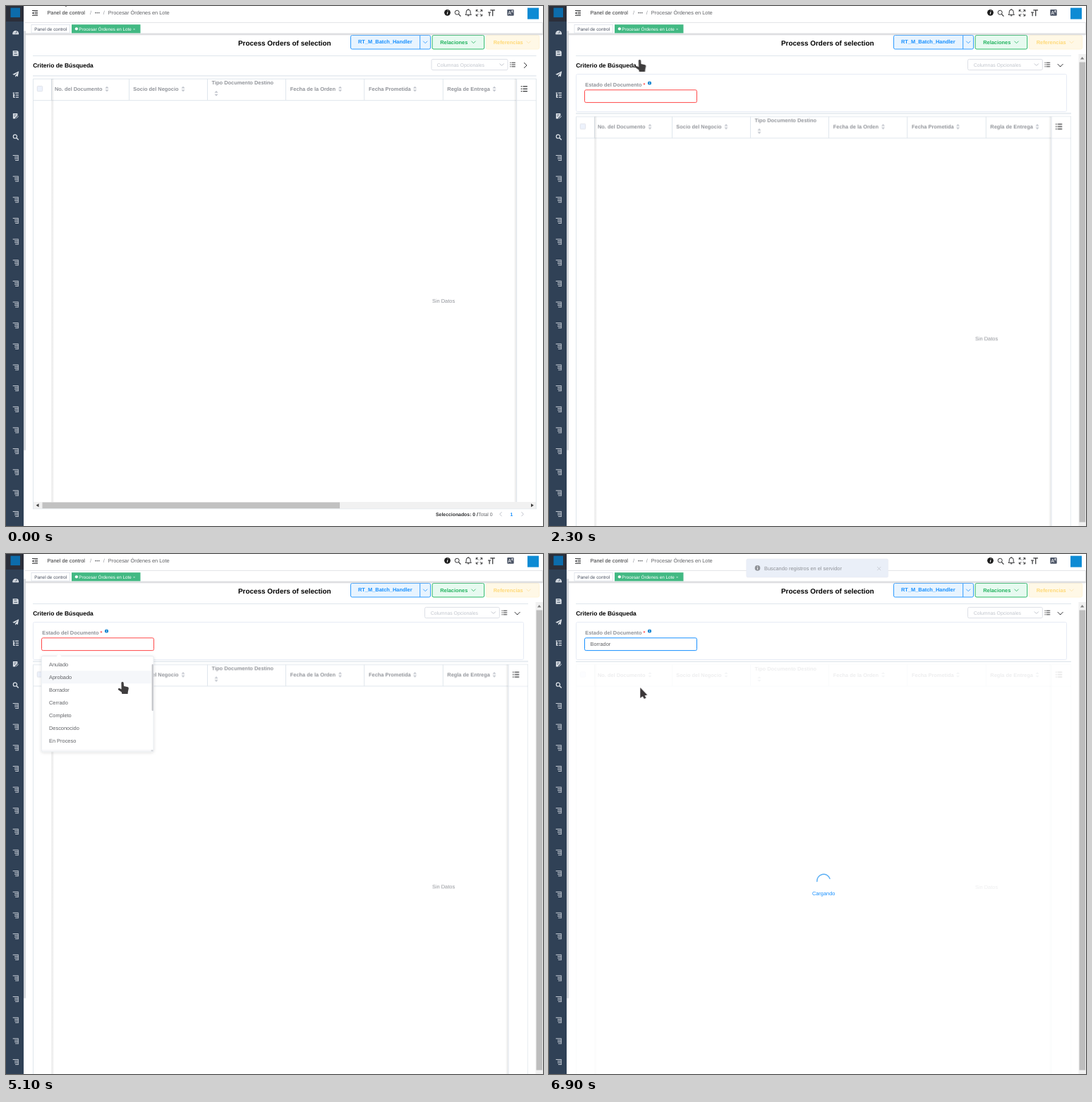
Recreate the animation shown at these times as an HTML page. Size 761x736 px, loop 8000 ms.

```html
<!DOCTYPE html>
<html lang="es">
<head>
<meta charset="utf-8">
<title>Procesar Órdenes en Lote</title>
<style>
html, body { margin: 0; width: 100%; height: 100%; overflow: hidden; background: #fff; }
svg { display: block; width: 100%; height: 100%; }
text { font: 7.42px "Liberation Sans", Arial, sans-serif; fill: #606266; text-rendering: geometricPrecision; white-space: pre; }
.b { font-weight: bold; }
.s12 { font-size: 6.36px; }
.s13 { font-size: 6.89px; }
.s16 { font-size: 8.48px; }
.s19 { font-size: 9.92px; }
.gray { fill: #909399; }
.ln { fill: none; stroke: #dfe6ec; }
.ic { fill: none; stroke: #303133; stroke-width: 1; }
.side { fill: none; stroke: #dfe4ea; stroke-width: 1; }
.side .f { fill: #dfe4ea; stroke: none; }

/* one loop = 8 s, 1.25% = 100 ms */
.a { animation: 8s step-end infinite; }
.open { animation-name: open; }
.shift { animation-name: shift; }
.edge { animation-name: edge; }
.sel { animation-name: sel; }
.ph { animation-name: ph; }
.turn { animation-name: turn; }
.hover { animation-name: hover; }
.field { animation-name: field; }
.value { animation-name: value; }
.caret { animation-name: caret; }
.drop { animation-name: drop; transform-origin: 50px 144px; }
.row { animation-name: row; }
.mask { animation-name: mask; }
.spin { animation-name: spin; transform-origin: 389px 461px; }
.msg { animation-name: msg; }
.cur { animation-name: cur; }
.arrow { animation-name: arrow; }
.hand { animation-name: hand; }

@keyframes open { 0% { opacity: 0 } 25%, 100% { opacity: 1 } }
@keyframes shift {
  0% { transform: translateY(0) } 25% { transform: translateY(14px) }
  26.25% { transform: translateY(34px) } 27.5% { transform: translateY(48px) }
  28.75%, 100% { transform: translateY(53.4px) }
}
@keyframes edge { 0% { transform: translateX(0) } 25%, 100% { transform: translateX(-11.7px) } }
@keyframes sel { 0% { x: 603px; width: 108px } 25%, 100% { x: 593.5px; width: 105.8px } }
@keyframes ph { 0% { transform: translateX(0) } 22.5% { transform: translateX(.5px) } 25%, 100% { transform: translateX(-9px) } }
@keyframes turn {
  0% { transform: translate(736px, 84px) } 25% { transform: translate(724.6px, 84px) rotate(25deg) }
  26.25% { transform: translate(724.6px, 84px) rotate(58deg) } 27.5% { transform: translate(724.6px, 84px) rotate(80deg) }
  28.75%, 100% { transform: translate(724.6px, 84px) rotate(90deg) }
}
@keyframes hover { 0% { opacity: 0 } 35% { opacity: 1 } 62.5%, 100% { opacity: 0 } }
@keyframes field { 0% { stroke: #ff4949 } 81.25%, 100% { stroke: #1890ff } }
@keyframes value { 0% { opacity: 0 } 81.25%, 100% { opacity: 1 } }
@keyframes caret { 0% { opacity: 0 } 50% { opacity: 1 } 57.5% { opacity: 0 } 67.5% { opacity: 1 } 71.25%, 100% { opacity: 0 } }
@keyframes drop {
  0% { opacity: 0; transform: none } 52.5% { opacity: .5; transform: scaleY(.75) }
  53.75% { opacity: 1; transform: none } 81.25% { opacity: .4; transform: scaleY(.8) }
  82.5%, 100% { opacity: 0; transform: none }
}
@keyframes row {
  0% { opacity: 0; transform: none } 62.5% { opacity: 1; transform: translateY(54px) }
  63.75% { opacity: 1; transform: translateY(18px) } 71.25%, 100% { opacity: 1; transform: translateY(36px) }
}
@keyframes mask { 0% { opacity: 0 } 81.25% { opacity: .4 } 82.5%, 100% { opacity: 1 } }
@keyframes spin {
  0% { transform: rotate(-80deg) } 82.5% { transform: rotate(-50deg) }
  85% { transform: rotate(-20deg) } 86.25%, 100% { transform: none }
}
@keyframes msg {
  0% { opacity: 0; transform: translateY(-7px) } 82.5% { opacity: .2; transform: translateY(-7px) }
  85% { opacity: .8; transform: translateY(-2px) } 86.25%, 100% { opacity: 1; transform: none }
}
@keyframes arrow {
  0% { opacity: 1 } 17.5% { opacity: 0 } 33.75% { opacity: 1 } 46.25% { opacity: 0 }
  60% { opacity: 1 } 62.5% { opacity: 0 } 85%, 100% { opacity: 1 }
}
@keyframes hand {
  0% { opacity: 0 } 17.5% { opacity: 1 } 33.75% { opacity: 0 } 46.25% { opacity: 1 }
  60% { opacity: 0 } 62.5% { opacity: 1 } 85%, 100% { opacity: 0 }
}
@keyframes cur {
  0% { transform: translate(79px, -15px) }
  6.25% { transform: translate(88px, 3px) }
  7.5% { transform: translate(112px, 34px) }
  8.75% { transform: translate(145px, 72px) }
  10% { transform: translate(173px, 102px) }
  11.25% { transform: translate(183px, 111px) }
  12.5% { transform: translate(172px, 104px) }
  13.75% { transform: translate(150px, 90px) }
  15% { transform: translate(134px, 80px) }
  16.25% { transform: translate(128.5px, 76px) }
  33.75% { transform: translate(133px, 84px) }
  35% { transform: translate(153px, 107px) }
  36.25% { transform: translate(180px, 132px) }
  37.5% { transform: translate(183px, 138px) }
  38.75% { transform: translate(172px, 137px) }
  48.75% { transform: translate(173px, 130px) }
  50% { transform: translate(172.7px, 127px) }
  60% { transform: translate(172.5px, 145px) }
  62.5% { transform: translate(172px, 207px) }
  63.75% { transform: translate(165px, 181px) }
  67.5% { transform: translate(150px, 181px) }
  68.75% { transform: translate(137px, 180px) }
  71.25% { transform: translate(133px, 185px) }
  72.5% { transform: translate(130px, 189px) }
  75%, 100% { transform: translate(129.3px, 189px) }
}
</style>
</head>
<body>
<svg viewBox="0 0 761 736" preserveAspectRatio="none">
  <defs>
    <path id="chev" d="M-3 -1.5L0 1.5L3 -1.5" fill="none"/>
    <path id="list" d="M-3.8 -2.8h1.3M-3.8 0h1.3M-3.8 2.8h1.3M-1.5 -2.8h5.3M-1.5 0h5.3M-1.5 2.8h5.3"/>
    <path id="sort" d="M-2.6 -1h5.2L0 -3.8zM-2.6 1h5.2L0 3.8z" fill="#c0c4cc"/>
    <linearGradient id="fade"><stop stop-color="#000" stop-opacity=".1"/><stop offset="1" stop-color="#000" stop-opacity="0"/></linearGradient>
    <filter id="soft" x="-10%" y="-20%" width="120%" height="140%"><feDropShadow dx="0" dy="1" stdDeviation="2.2" flood-opacity=".14"/></filter>
  </defs>
  <rect width="761" height="736" fill="#fff"/>

  <!-- search form -->
  <g class="a open">
    <rect class="a hover" x="38.5" y="96.5" width="695" height="53" rx="2" fill="#fff" filter="url(#soft)"/>
    <rect x="38.5" y="96.5" width="695" height="53" rx="2" fill="#fff" stroke="#e6ebf5"/>
    <text class="b gray" x="51.3" y="114">Estado del Documento</text>
    <text class="b" x="133.5" y="114" style="fill:#ff4949">*</text>
    <circle cx="142.5" cy="109" r="2.6" fill="#1a86d0"/>
    <path d="M142.5 108.6v1.8M142.5 107.2v.7" stroke="#fff" stroke-width=".7"/>
    <rect class="a field" x="50.5" y="118.8" width="159" height="17.8" rx="2" fill="#fff"/>
    <text class="a value" x="58.5" y="130.3">Borrador</text>
    <path class="a caret" d="M59.5 124v8" stroke="#606266"/>
  </g>

  <!-- table -->
  <g class="a shift">
    <rect x="27" y="98" width="734" height="700" fill="#fff"/>
    <path class="ln" d="M38 98.9H751.5" stroke-width="1.2"/>
    <path class="ln" d="M38.5 712V103.2H751.5M38 133.7H751.5M38 711.7H751.5"/>
    <g id="head"></g>
    <rect x="64.5" y="103" width="4" height="599" fill="url(#fade)"/>
    <rect x="44.3" y="113.4" width="7.4" height="7.4" rx="1" fill="#edf2fc" stroke="#dcdfe6" stroke-width=".8"/>
    <text class="gray" x="604" y="420.2">Sin Datos</text>
    <rect x="39" y="702" width="712" height="9.4" fill="#f1f1f1"/>
    <rect x="51.5" y="702.5" width="421.5" height="8.6" fill="#c1c1c1"/>
    <path d="M46.5 704.3v5L42.6 706.8z" fill="#404040"/>
    <g class="a edge">
      <rect x="724" y="103.8" width="27" height="29.4" fill="#fff"/>
      <rect x="-723.5" y="103" width="4" height="599" fill="url(#fade)" transform="scale(-1 1)"/>
      <path class="ln" d="M723.7 103V702M751.3 103V712"/>
      <use href="#list" class="ic" transform="translate(734.3 117.3) scale(1.2)"/>
      <path d="M744 704.3v5l3.9 -2.5z" fill="#404040"/>
    </g>
    <text class="b s13" x="609" y="721.7" style="fill:#303133">Seleccionados: 0 /</text>
    <text class="s13" x="669.3" y="721.7">Total 0</text>
    <path d="M702.5 716.2l-2.8 3 2.8 3M730.5 716.2l2.8 3 -2.8 3" fill="none" stroke="#b8bcc4" stroke-width=".9"/>
    <text class="b s13" x="714.5" y="721.5" style="fill:#1890ff">1</text>
  </g>

  <!-- loading -->
  <g class="a mask">
    <rect x="38" y="154.5" width="702" height="582" fill="#fff" fill-opacity=".84"/>
    <path class="a spin" d="M379.8 463.5A9.4 9.4 0 0 1 398 459.5" fill="none" stroke="#58aef5" stroke-width="1.4" stroke-linecap="round"/>
    <text x="372.9" y="482.7" style="fill:#1890ff">Cargando</text>
  </g>

  <!-- criteria row -->
  <path class="ln" d="M38 70.5H751.5" stroke="#e6ebf5"/>
  <text class="b s16" x="38.2" y="87.2" style="fill:#000">Criterio de Búsqueda</text>
  <rect class="a sel" x="603" y="75.4" width="108" height="15.2" rx="2" fill="#fff" stroke="#dcdfe6"/>
  <text class="a ph s13" x="610.7" y="85.8" style="fill:#c0c4cc">Columnas Opcionales</text>
  <g class="a edge">
    <use href="#chev" x="702.5" y="83" stroke="#c0c4cc"/>
    <use href="#list" class="ic" x="718" y="83"/>
  </g>
  <g class="a turn"><path class="ic" d="M-2 -3.8L2 0L-2 3.8" stroke-width="1.2"/></g>

  <!-- page scrollbar -->
  <g class="a open">
    <rect x="740" y="68" width="21" height="668" fill="#fff"/>
    <rect x="750.5" y="68" width="10.5" height="668" fill="#f1f1f1"/>
    <rect x="751.5" y="79.5" width="8.6" height="651" fill="#bdbdbd"/>
    <path d="M753 75.6h5.4L755.7 72z" fill="#808080"/>
  </g>

  <!-- title and buttons -->
  <text class="b s19" x="329" y="55.6" style="fill:#000">Process Orders of selection</text>
  <g stroke-width="1">
    <path d="M490.5 41.5H599.5q2 0 2 2V59q0 2 -2 2H490.5q-2 0 -2 -2V43.5q0 -2 2 -2zM586.7 41.5V61" fill="#e8f4ff" stroke="#2f9bff"/>
    <text class="b" x="499" y="53.4" style="fill:#1890ff">RT_M_Batch_Handler</text>
    <use href="#chev" x="594.2" y="51.2" stroke="#1890ff" stroke-width=".8"/>
    <rect x="604" y="41.5" width="73.7" height="19.5" rx="2" fill="#e7faf0" stroke="#2bb866"/>
    <text class="b" x="615.2" y="53.8" style="fill:#22b35e">Relaciones</text>
    <use href="#chev" x="662.5" y="51.2" stroke="#22b35e" stroke-width=".8"/>
    <rect x="680.3" y="41.5" width="75.4" height="19.5" rx="2" fill="#fff8e6" stroke="#fff3d6"/>
    <text class="b" x="690.7" y="53.8" style="fill:#ffd978">Referencias</text>
    <use href="#chev" x="740.5" y="51.2" stroke="#ffe3a0" stroke-width=".8"/>
  </g>

  <!-- top bar -->
  <path d="M27 23.5H760.5V39" fill="none" stroke="#e4e5e8"/>
  <rect x="26" y="38.4" width="735" height="2.8" rx="1.3" fill="#dedfe1"/>
  <rect x="36" y="26.5" width="54.5" height="11.6" fill="#fff" stroke="#d8dce5" stroke-width=".7"/>
  <text class="s12" x="40.3" y="34.7" style="fill:#495060">Panel de control</text>
  <rect x="93" y="26.2" width="97.5" height="12.2" fill="#42b983"/>
  <circle cx="99.9" cy="32.3" r="2.1" fill="#fff"/>
  <text class="s12" x="103.3" y="34.7" style="fill:#fff">Procesar Órdenes en Lote</text>
  <path d="M180.6 31.8l2 2m0 -2l-2 2" stroke="#fff" stroke-width=".5"/>

  <path class="ic" d="M37 6.5h8M40.5 8.8h4.5M40.5 11h4.5M37 13.3h8"/>
  <path d="M39.3 8v4l-2.3 -2z" fill="#303133"/>
  <text x="58.4" y="12.2" style="fill:#303133">Panel de control</text>
  <text class="gray" x="119" y="12.2">/</text>
  <path d="M127 9.6h.01M129.4 9.6h.01M131.8 9.6h.01" stroke="#606266" stroke-width="1.7" stroke-linecap="round"/>
  <text class="gray" x="137.8" y="12.2">/</text>
  <text x="144.8" y="12.2">Procesar Órdenes en Lote</text>

  <circle cx="625.5" cy="9.3" r="4.4" fill="#1c1c1c"/>
  <path d="M625.9 8.4l-.6 3.2M626.2 6.2l-.1 .9" stroke="#fff" stroke-width="1.1"/>
  <g class="ic">
    <circle cx="639.2" cy="9.2" r="3"/><path d="M641.4 11.4l3 3.2" stroke-width="1.3"/>
    <path d="M651 12.3h8.4l-1.2 -1.6V8.2q0 -3 -3 -3t-3 3v2.5zM655.2 5.2V4M654 13.8h2.4"/>
    <path d="M666.3 8V5.6h2.4M666.3 5.6l3 3M672.3 5.6h2.4V8M674.7 5.6l-3 3M666.3 11.6V14h2.4M666.3 14l3 -3M672.3 14h2.4v-2.4M674.7 14l-3 -3"/>
    <path d="M686.3 5.8h6.6M689.7 5.8v8.4M683 9h4.2M685.1 9v5.2" stroke-width="1.2"/>
  </g>
  <rect x="710.3" y="5" width="9.4" height="8.8" rx="1" fill="#4c5566"/>
  <path d="M711.8 12l1.9 -5 1.9 5M712.5 10.4h2.5M716.3 6.8h2.4m-1.2 -.8q.3 2.2 -1.2 3.2m.4 -2q.7 1.5 2 2" fill="none" stroke="#fff" stroke-width=".7"/>
  <rect x="739" y="2.6" width="16" height="16" fill="#0d8bd4"/>

  <!-- sidebar -->
  <rect width="25" height="736" fill="#304156"/>
  <rect width="25" height="22" fill="#2b2f3a"/>
  <rect x="6.5" y="2.6" width="13.5" height="13.5" fill="#0c6cab"/>
  <rect x="25.2" y="35" width="2.6" height="594" rx="1.2" fill="#d0d3d8"/>
  <g id="menu" class="side"></g>

  <!-- dropdown -->
  <g class="a drop">
    <rect x="50.3" y="144.5" width="158.7" height="135.2" rx="2" fill="#fff" stroke="#e4e7ed" stroke-width=".8" filter="url(#soft)"/>
    <path d="M71.5 145l3.5 -3.2 3.5 3.2z" fill="#fff"/>
    <rect class="a row" x="50.7" y="147.3" width="155.5" height="18" fill="#f5f7fa"/>
    <g id="items"></g>
    <path d="M51 277.8H205" stroke="#eceef2" stroke-width=".8"/>
    <rect x="206.6" y="156" width="2.2" height="66" rx="1" fill="#c3c5c9"/>
    <rect x="205.5" y="277.2" width="3" height="2" fill="#d5d7db"/>
  </g>

  <!-- message -->
  <g class="a msg">
    <rect x="279.8" y="7" width="200.8" height="26" rx="2" fill="#eaeff8" stroke="#e6eaf2" stroke-width=".6"/>
    <circle cx="295.5" cy="19.9" r="3.8" fill="#909399"/>
    <path d="M295.5 19.2v3M295.5 17.3v1" stroke="#fff" stroke-width=".9"/>
    <text class="gray" x="305" y="22.5">Buscando registros en el servidor</text>
    <path d="M465.2 18.2l5 5m0 -5l-5 5" stroke="#c0c4cc" stroke-width=".8"/>
  </g>

  <!-- pointer -->
  <g class="a cur">
    <path class="a arrow" d="M0 0V15L3.4 12.2L5.6 16L8.2 14.8L6.4 11.2L10 10.4z" fill="#3a3638"/>
    <path class="a hand" d="M-1.6 1.4Q-1.4 0 0 0T1.7 1.4L2 6L7.6 7.2Q9 7.6 8.8 9.4L7.8 14.2L7.6 17H-.6L-1.2 14.6L-5.8 11.2Q-6.8 10 -5.6 9.2T-3.2 9.6L-1.4 10.6z" fill="#3f3d3e"/>
  </g>
</svg>
<script>
const put = (id, html) => { document.getElementById(id).innerHTML = html; };

// header cells: label, text x, sort mark x, right border, two-line flag
const heads = [
  ["No. del Documento", 69, 143, 174.5],
  ["Socio del Negocio", 180.3, 251, 285.5],
  ["Tipo Documento Destino", 291.6, 298, 396.5, true],
  ["Fecha de la Orden", 402.8, 473.5, 507.7],
  ["Fecha Prometida", 514, 579.5, 619.3],
  ["Regla de Entrega", 625.3, 692, 64.6]
];
put("head", heads.map(([label, x, mark, line, two]) =>
  `<text class="b gray" x="${x}" y="${two ? 111.3 : 120.2}">${label}</text>
   <use href="#sort" x="${mark}" y="${two ? 123.7 : 117.5}"/>
   <path class="ln" d="M${line} 103V133.7"/>`).join(""));

const items = ["Anulado", "Aprobado", "Borrador", "Cerrado", "Completo", "Desconocido", "En Proceso"];
put("items", items.map((s, i) => `<text x="61" y="${159 + i * 18}">${s}</text>`).join(""));

const icons = [
  `<path class="f" d="M-4.3 3A4.4 4.4 0 1 1 4.3 3z"/><path d="M0 2L1.2 -1.6M-2.6 .8h.8M2 .8h.8" stroke="#304156" stroke-width=".9"/>`,
  `<path class="f" d="M-4 -3.5H2.5L4 -2V3.8H-4z"/><path d="M-2.4 -1.8h4M-2.4 1.4h4.8" stroke="#304156"/>`,
  `<path class="f" d="M4.5 -4.2L-4.5 .2L-1.8 1.3L3 -2.6L-.6 2V4.2L.9 2.5L3 3.4z"/>`,
  `<path d="M-4 -3h2.4M-.6 -3h4.8M-3 -2V3H-.8M-3 0h2.2M.2 0h4M.2 3h4" stroke-width="1.4"/>`,
  `<path class="f" d="M-3.8 -3.8H2.6V-.6L-.4 2.2V3.6H-3.8z"/><path d="M-2.4 -1.8h3.6M-2.4 .2h2" stroke="#304156" stroke-width=".8"/><path d="M.6 3.2L4 .2"/>`,
  `<circle cx="-.8" cy="-.8" r="2.6" stroke-width="1.2"/><path d="M1.2 1.2L4 4" stroke-width="1.4"/>`
];
const nested = `<path d="M-4 -3.6H4M-1.6 -1.3H4M-1.6 1H4M-.6 3.4H4" stroke-width=".9"/><path d="M3.7 -3.6V3.8" stroke-width=".6"/>`;
put("menu", Array.from({ length: 24 }, (_, i) =>
  `<g transform="translate(13.7 ${37.2 + i * 29.65})">${icons[i] || nested}</g>`).join(""));
</script>
</body>
</html>
```
